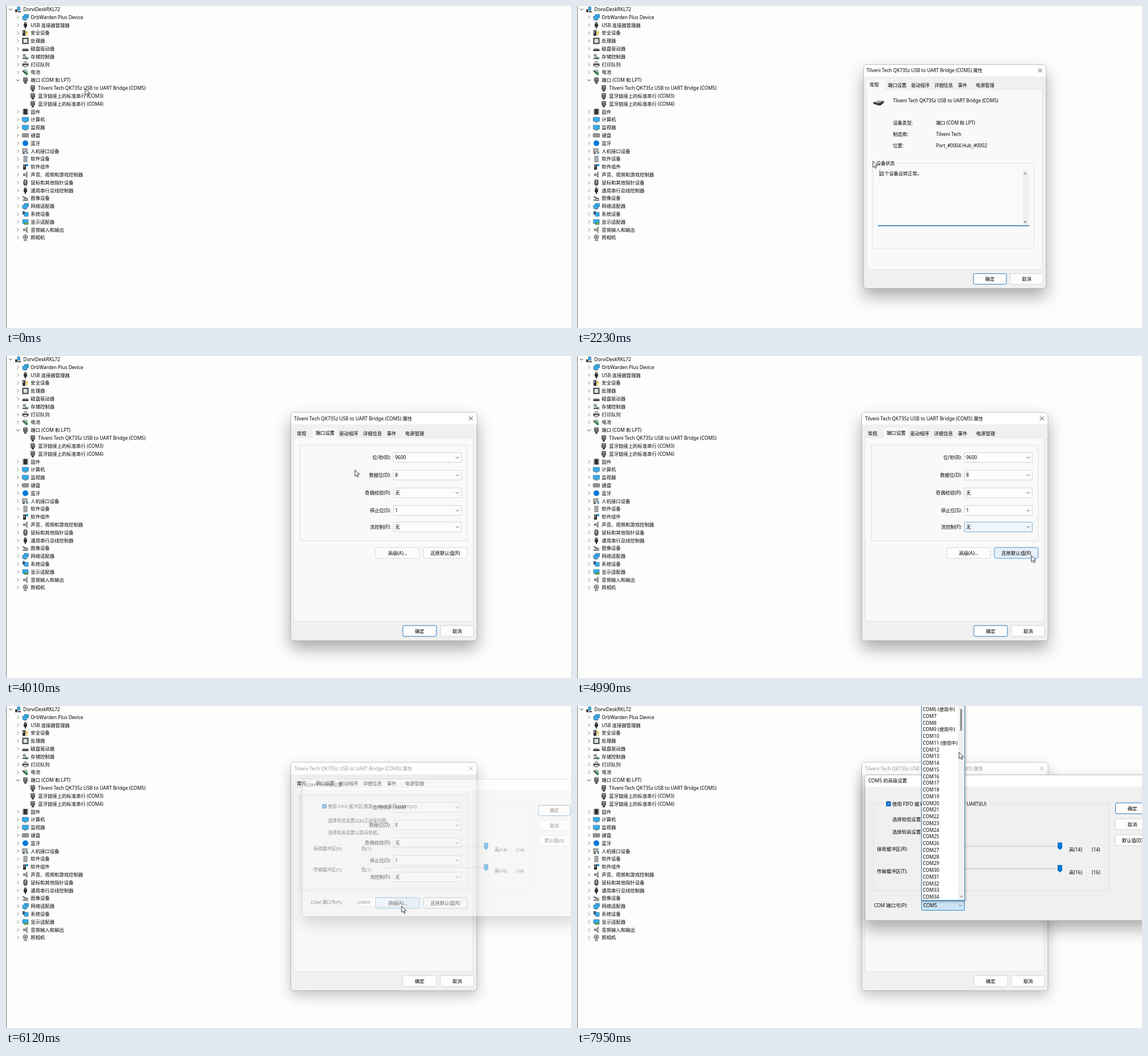
These frames come from a looping animation (991x565 px, 7.99 s). An HTML page:

```html
<!DOCTYPE html>
<html lang="zh-CN">
<head>
<meta charset="utf-8">
<title>Port settings</title>
<style>
html, body { margin: 0; height: 100%; overflow: hidden; background: #fdfdfc; }
svg { display: block; width: 100vw; height: 100vh; }
text { font: 8.35px "Noto Sans", "Noto Sans CJK SC", "Noto Sans CJK", sans-serif; fill: #000; white-space: pre; }
.mid { text-anchor: middle; }
.end { text-anchor: end; }
.strong { font-weight: 700; }
.window { filter: drop-shadow(0 14px 14px rgba(0, 0, 0, .32)); }
.inactive .window { filter: drop-shadow(0 9px 11px rgba(0, 0, 0, .22)); }
.popup { filter: drop-shadow(1px 2px 2px rgba(0, 0, 0, .3)); }
</style>
</head>
<body>
<svg id="stage" viewBox="0 0 991 565"></svg>
<script>
const LOOP = 7990, BLUE = '#2b88c8', LINE = '#d5d5d5', FACE = '#fdfdfd';
const DEVICE = 'Tilveni Tech QK735z USB to UART Bridge (COM5)';

// Shape helpers: text is placed by its vertical centre.
const text = (x, y, s, more = '') => `<text x="${x}" y="${y + 3}" ${more}>${s}</text>`;
const rect = (x, y, w, h, fill, stroke = 'none', rx = 0, more = '') =>
  `<rect x="${x}" y="${y}" width="${w}" height="${h}" rx="${rx}" fill="${fill}" stroke="${stroke}" ${more}/>`;
const fill = (color, d) => `<path fill="${color}" d="${d}"/>`;
const line = (color, d, width = 1) => `<path fill="none" stroke="${color}" stroke-width="${width}" d="${d}"/>`;
const group = (id, content) => `<g id="${id}">${content}</g>`;
const at = (x, y, content) => `<g transform="translate(${x} ${y})">${content}</g>`;
const chevron = (x, y, color = '#555') => line(color, `M${x - 2.7} ${y - 1.3}l2.7 2.7 2.7-2.7`);
const button = (id, x, y, w, label) =>
  rect(x, y, w, 19, FACE, LINE, 2.5, `id="${id}"`) + text(x + w / 2, y + 9.5, label, 'class="mid"');
const combo = (id, x, y, w, value) =>
  rect(x, y, w, 17, FACE, LINE, 1.5, `id="${id}"`) + text(x + 3, y + 8.5, value) + chevron(x + w - 7, y + 8.5);

const screen = (x, y, w, h) => rect(x, y, w, h, '#35aef0', '#3b6d8f', .5, 'stroke-width=".8"');
const disc = (x, y, r, color) => `<circle cx="${x}" cy="${y}" r="${r}" fill="${color}"/>`;
const icons = {
  pc: screen(-1, -4.5, 4.5, 6) + fill('#444', 'M-5 0h4v5h-4zM0 3h5v2H0z'),
  displays: screen(-2, -5, 7.5, 6) + screen(-5, -2, 8, 6) + line('#456', 'M-3 5h5'),
  plug: fill('#333', 'M-2-5h4v3h1v4L1 4v2h-2V4l-2-2v-4h1z') + fill('#ddd', 'M-1-4h.8v1.5H-1zM.4-4h.8v1.5H.4z'),
  key: fill('#333', 'M-5-5h5V5h-5z') + fill('#ddd', 'M-4-3h2v2h-2z') + disc(2.5, -1.5, 2, '#e8b923') + line('#e8b923', 'M2.5 0v5', 1.5),
  cpu: rect(-4.5, -4.5, 9, 9, '#dfe6df', '#3b423d', 0, 'stroke-width="2"'),
  disk: fill('#aaa', 'M-4-1h8l1.5 2h-11z') + fill('#3c3c3c', 'M-5.5 1h11v3h-11z'),
  storage: disc(-2, -2, 2.8, '#8a9a91') + fill('#444', 'M-5 2h7v2h-7z') + line('#467e5b', 'M0 0l5 4M2 5l3-4', 1.5),
  printer: fill('#555', 'M-5.5-2h11v5h-11z') + fill('#e8e8e8', 'M-3-4.5h6v2h-6zM-3 1h6v3h-6z') + line('#444', 'M-3-4.5h6M-3 4h6'),
  battery: disc(0, -1, 4, '#99b9a5') + line('#222', 'M-5-3L4 4', 1.6) + disc(2, 2.5, 2.4, '#369052'),
  port: rect(-4, -5, 8, 8, '#555', 'none', 1.5) + rect(-2, 3, 4, 3, '#444') +
    line('#ddd', 'M-2-4v3M0-4v3M2-4v3', .8) + line('#999', 'M-3 1h6', .8),
  firmware: rect(-3, -5, 6, 10, '#333') + line('#777', 'M-4-5V5M4-5V5', 1.4),
  monitor: screen(-5.5, -4, 11, 7) + line('#456', 'M-3 4.5h6'),
  keyboard: rect(-5.5, -3, 11, 6, '#bbb', '#555', .5) + line('#555', 'M-4-1h8M-4 1h8', .8),
  dot: disc(0, 0, 5, '#0078d7'),
  input: rect(-5, -4, 8, 5, '#bbb', '#666') + fill('#555', 'M-5 2h4v3h-4z') + disc(3, 3, 2.3, '#789bb0'),
  box: rect(-3, -5, 6, 10, '#a4a9ad', '#8b8f92'),
  part: rect(-4, -4, 5, 9, '#333') + fill('#ddd', 'M-3-2h2v2h-2z') + fill('#259bd8', 'M1-5h4v4H1z'),
  speaker: fill('#777', 'M-4-2h3v4h-3z') + fill('#aaa', 'M-1-2L3-5.5v11L-1 2z') + line('#555', 'M3-5.5v11'),
  mouse: rect(-3, -5, 6, 10, '#777', '#222', 3) + line('#eee', 'M0-4v4'),
  scanner: line('#444', 'M-5-3L4 1M-5 3h9', 1.5) + rect(-1, 0, 5, 4, '#ccc', '#555') + disc(2, 2, 1, '#77a45c'),
  system: screen(-2, -3, 7, 7) + fill('#355e80', 'M-5-5h4v6h-4z'),
  adapter: screen(-5, -4, 10, 7) + fill('#3f8b50', 'M-2 1h7v4h-7z') + disc(2, 3, 1.2, '#e3c542'),
  webcam: disc(0, -1, 4.5, '#777') + disc(0, -1, 3, '#ddd') + disc(0, -1, 1.6, '#444') + line('#666', 'M-3 5h6', 1.4)
};

const tree = `pc DorviDeskRKL72
displays OrbWarden Plus Device
plug USB 连接器管理器
key 安全设备
cpu 处理器
disk 磁盘驱动器
storage 存储控制器
printer 打印队列
battery 电池
port 端口 (COM 和 LPT)
port ${DEVICE}
port 蓝牙链接上的标准串行 (COM3)
port 蓝牙链接上的标准串行 (COM4)
firmware 固件
monitor 计算机
monitor 监视器
keyboard 键盘
dot 蓝牙
input 人机接口设备
box 软件设备
part 软件组件
speaker 声音、视频和游戏控制器
mouse 鼠标和其他指针设备
plug 通用串行总线控制器
scanner 图像设备
displays 网络适配器
system 系统设备
adapter 显示适配器
speaker 音频输入和输出
webcam 照相机`.split('\n').map((row, i) => {
  const [, icon, label] = row.match(/^(\S+) (.*)$/);
  const y = 6 + i * 13.81, x = i === 0 ? 21 : i > 9 && i < 13 ? 47 : 34;
  const arrow = i === 0 || i === 9 ? chevron(x - 13, y, '#222')
    : x === 34 ? line('#777', `M19.7 ${y - 2.7}l2.7 2.7-2.7 2.7`) : '';
  return arrow + at(x, y, icons[icon]) + text(x + 9.3, y, label);
}).join('');

const menuRows = [157, 172, 187.5, 207.5, 228];
const menu = rect(135, 147, 147, 91, '#f9f9f9', '#cfcfcf', 0, 'class="popup"') +
  rect(137, 0, 143, 15, '#cfe6f8', 'none', 0, 'id="menuHover"') +
  ['更新驱动程序(P)', '禁用设备(D)', '卸载设备(U)', '扫描检测硬件改动(A)', '属性(R)']
    .map((s, i) => text(157, menuRows[i], s, i === 4 ? 'class="strong"' : '')).join('') +
  line('#d7d7d7', 'M157 197.5h122M157 217.5h122');

const selectedTab = (x, w) => rect(x, 126, w, 18, '#f9f9f9');
const generalPage = selectedTab(505, 33) +
  at(527, 167, fill('#a8a8a8', 'M-10-1L0-4l10 1-9 4z') + fill('#383838', 'M-10-1l9 2v4l-9-3zM-1 1l10-4v3l-6 5-4 0z')) +
  text(552, 163.5, DEVICE) +
  [['设备类型:', '端口 (COM 和 LPT)'], ['制造商:', 'Tilveni Tech'], ['位置:', 'Port_#0004.Hub_#0002']]
    .map(([k, v], i) => text(552, 203.5 + i * 20.3, k) + text(629, 203.5 + i * 20.3, v)).join('') +
  rect(516, 275.5, 288, 152, 'none', '#e2e2e2') + rect(520, 270, 37, 11, '#f9f9f9') + text(522, 275.5, '设备状态') +
  rect(525, 287, 271, 100, '#fafafa') + rect(784, 287, 11, 99, '#f0f0f0') +
  fill('#9a9a9a', 'M785.5 295.5h6l-3-4.5zM785.5 379h6l-3 4.5z') + line('#1667b7', 'M525 387.3h271', 1.6) +
  text(528.5, 293.5, '这个设备运转正常。') + line('#222', 'M528.5 288v11', .9);

const portPage = selectedTab(538, 43) + rect(516, 156.5, 293, 167.5, 'none', '#dedee2') +
  [['位/秒(B):', '9600'], ['数据位(D):', '8'], ['奇偶校验(P):', '无'], ['停止位(S):', '1'], ['流控制(F):', '无']]
    .map(([k, v], i) => {
      const y = i === 4 ? 300 : 178 + i * 31;
      return text(675, y, k, 'class="end"') + combo('combo' + i, 679.5, y - 8.5, 119, v);
    }).join('') +
  button('advanced', 648.5, 336, 76.5, '高级(A)...') + button('restore', 732, 336, 77, '还原默认值(R)');

const properties = rect(499.5, 99, 326.5, 400.5, '#f0f0f0', '#b3b3bd', 5, 'class="window"') +
  fill('#fff', 'M500 120v-16q0-4.5 4.5-4.5h316.5q4.5 0 4.5 4.5v16z') +
  group('caption', text(505, 109.5, DEVICE + ' 属性') + line('#333', 'M812 106.2l6.6 6.6M818.6 106.2l-6.6 6.6')) +
  rect(505, 143, 314, 322.5, '#f9f9f9', '#e3e3e3') + group('general', generalPage) + group('ports', portPage) +
  [[510, '常规'], [543, '端口设置'], [584.5, '驱动程序'], [626, '详细信息'], [668, '事件'], [700, '电源管理']]
    .map(([x, s], i) => group('tab' + i, text(x, 135.5, s))).join('') +
  button('ok', 696, 473, 59, '确定') + button('cancel', 762, 473, 58.5, '取消');

const slider = (y, label, max, ticks) => text(526, y, label) + text(615, y, '低(1)') +
  rect(657, y - 5.5, 194, 2, '#e4e4e4', '#d2d2d2', 0, 'stroke-width=".6"') +
  ticks.map(x => line('#c9c9c9', `M${x} ${y + 3}v2`, .8)).join('') +
  fill('#0078d4', `M843 ${y - 11}h8v9.5l-4 3.7-4-3.7z`) +
  text(863, y + 1.5, `高(${max})`) + text(903, y + 1.5, `(${max})`);

const advancedWindow = rect(505, 121, 509, 255.5, '#f0f0f0', '#aaaab0', 5, 'class="window"') +
  fill('#fff', 'M505.5 141.5v-16q0-4 4.5-4h500v20z') + text(511, 131, 'COM5 的高级设置') +
  rect(520, 171, 413, 153, 'none', '#dedede') + rect(538, 165, 187, 13, '#f0f0f0') +
  rect(542, 167.3, 8.6, 8.6, '#0067c0', 'none', 1.5) + line('#fff', 'M544 171.6l1.7 1.7 3-3.2') +
  text(553, 171.5, '使用 FIFO 缓冲区(需要 16550 兼容 UART)(U)') +
  text(553, 198.5, '选择较低设置以纠正连接问题。') + text(553, 220.5, '选择较高设置以提高性能。') +
  slider(250.5, '接收缓冲区(R):', 14, [661, 784]) + slider(290, '传输缓冲区(T):', 16, [661, 723]) +
  text(521, 350, 'COM 端口号(P):') + combo('portNumber', 604.5, 341.5, 75, 'COM5') +
  button('ok2', 944.5, 170, 59, '确定') + button('cancel2', 944.5, 198, 59, '取消') + button('default2', 944.5, 226, 59, '默认值(D)');

const busy = [5, 6, 9, 11];
const portList = rect(604.5, -20, 75.5, 361, '#fff', BLUE, 0, 'class="popup"') +
  '<clipPath id="listClip"><rect x="605" y="-10" width="63" height="351"/></clipPath><g clip-path="url(#listClip)">' +
  Array.from({ length: 30 }, (_, i) => i + 5)
    .map(n => text(606.5, 6 + (n - 6) * 11.75, `COM${n}` + (busy.includes(n) ? ' (使用中)' : ''))).join('') + '</g>' +
  rect(668.5, -10, 10.5, 350, '#f1f1f1') + rect(672.3, 5, 3, 38.5, '#858585', 'none', 1.5) +
  fill('#aaa', 'M671 333h6l-3 4z');

const stage = document.getElementById('stage');
stage.innerHTML = rect(0, 0, 991, 565, '#fdfdfc') + rect(0, 0, 1, 565, '#777') +
  rect(55, 137.5, 201, 13.5, '#cce8ff', 'none', 0, 'id="selection"') + tree +
  group('menu', menu) + group('properties', properties) + group('advancedWindow', advancedWindow) + group('portList', portList) +
  '<path id="cursor" fill="#fff" stroke="#222" stroke-width=".9" d="M0 0V11.3L2.6 8.9 4.3 12.8 6.1 12 4.4 8.2H8z"/>';

const byId = id => document.getElementById(id);
const show = (id, on) => byId(id).style.display = on ? '' : 'none';
const paint = (id, border, face = FACE) => {
  byId(id).setAttribute('stroke', border);
  byId(id).setAttribute('fill', face);
};

// Pointer stops: time, x, y.
const path = [
  [0, 139, 145], [690, 139, 145], [900, 135, 147], [1280, 135, 147], [1500, 148, 180], [1660, 158, 230],
  [1820, 158, 230], [2230, 519, 272], [2640, 519, 272], [3240, 598, 144], [3420, 598, 144], [3600, 562, 136],
  [3760, 562, 136], [4220, 650, 248], [4500, 680, 268], [4860, 745, 300], [4990, 797, 350], [5400, 797, 350],
  [5760, 694, 351], [6300, 694, 351], [7010, 674, 349], [7400, 674, 349], [7920, 670, 81], [LOOP, 670, 81]
];
function pointer(t) {
  const i = path.findIndex(p => p[0] > t);
  const [a, b] = [path[i - 1], path[i]];
  const p = (t - a[0]) / (b[0] - a[0]), e = p * p * (3 - 2 * p);
  return [a[1] + (b[1] - a[1]) * e, a[2] + (b[2] - a[2]) * e];
}

function openWindow(id, t, start, cx, cy) {
  const p = Math.min(1, Math.max(0, (t - start) / 240));
  const scale = 1 - .1 * (1 - p) ** 3;
  show(id, p > 0);
  byId(id).setAttribute('opacity', Math.min(1, p * 2.5));
  byId(id).setAttribute('transform', `translate(${cx} ${cy}) scale(${scale}) translate(${-cx} ${-cy})`);
}

function draw(t) {
  const [x, y] = pointer(t);
  const onPorts = t >= 3640, restored = t >= 5200, modal = t >= 6080, listOpen = t >= 7200;
  const menuOpen = t >= 1000 && t < 1820;
  byId('cursor').setAttribute('transform', `translate(${x} ${y})`);

  show('menu', menuOpen);
  show('selection', menuOpen);
  const row = menuRows.find(r => Math.abs(y - r) < 8);
  show('menuHover', row !== undefined && y > 150);
  if (row) byId('menuHover').setAttribute('y', row - 7.5);

  openWindow('properties', t, 2130, 662.75, 299);
  openWindow('advancedWindow', t, 6080, 759.5, 249);
  byId('properties').classList.toggle('inactive', modal);
  byId('caption').setAttribute('opacity', modal ? .4 : 1);
  show('portList', listOpen);
  show('general', !onPorts);
  show('ports', onPorts);
  byId('tab0').setAttribute('transform', `translate(0 ${onPorts ? 0 : -1})`);
  byId('tab1').setAttribute('transform', `translate(0 ${onPorts ? -1 : 0})`);

  const overRestore = t >= 4940 && t < 5520, overAdvanced = t > 5640;
  const pressed = t >= 5840 && t < 6000, overCombo = t > 4780 && t < 5040;
  paint('ok', restored ? LINE : '#2878bd');
  paint('restore', overRestore ? '#4a93d1' : restored ? '#91c4d0' : LINE, overRestore ? '#e5f0f9' : FACE);
  paint('advanced', pressed ? '#f0f0f0' : overAdvanced ? '#75afd9' : LINE, pressed ? '#f8f8f8' : overAdvanced ? '#e5f0f9' : FACE);
  paint('combo4', overCombo ? '#7eafd8' : LINE, overCombo ? '#f0f6fb' : FACE);
  paint('portNumber', listOpen ? BLUE : LINE, listOpen ? '#cce4f7' : FACE);
  paint('ok2', '#2878bd');
}

const begin = performance.now();
function tick() {
  draw((performance.now() - begin) % LOOP);
  requestAnimationFrame(tick);
}
tick();
</script>
</body>
</html>
```
